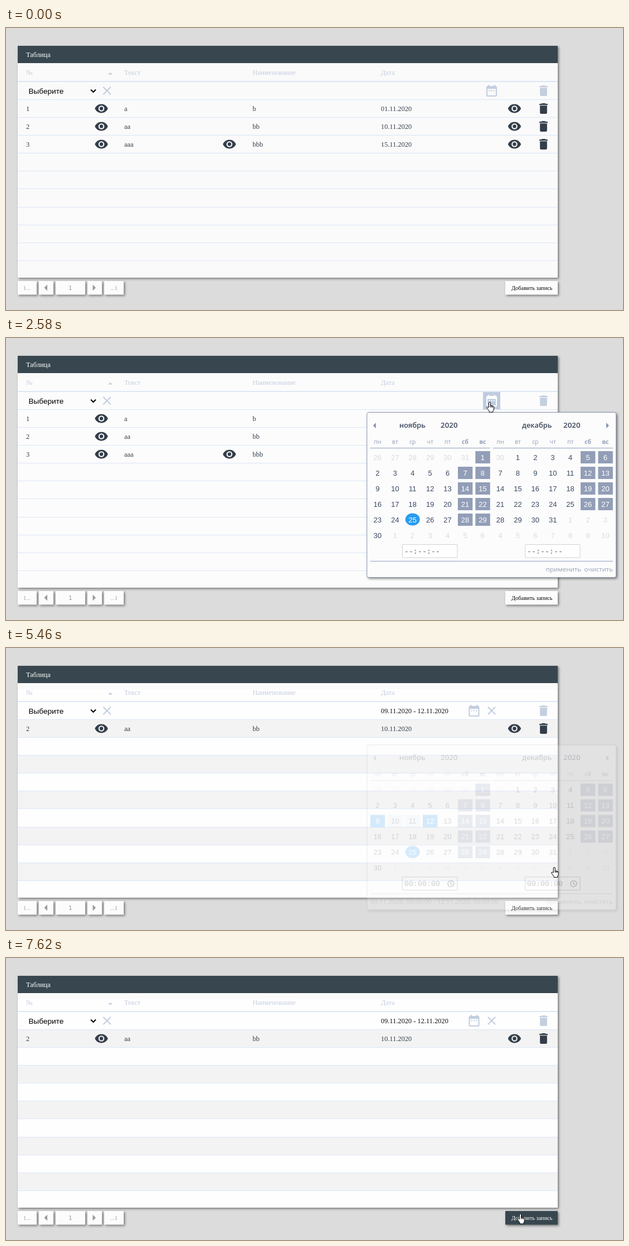
Write an HTML page that moves like this. It is 1106 px wide and 506 px high and loops after 7990 ms.

```html
<!DOCTYPE html>
<html lang="ru">
<head>
<meta charset="utf-8">
<style>
html, body { margin: 0; width: 100%; height: 100%; overflow: hidden; background: #dcdcdc; }
svg { display: block; width: 1106px; height: 506px; }
text { white-space: pre; }
.cell { font: 12.4px "Liberation Serif", serif; }
.btn { font: 10.4px "Liberation Serif", serif; }
.select { font: 13.6px "Liberation Sans", sans-serif; }
.page { font: 10.5px "Liberation Sans", sans-serif; }
.day { font: 13px "Liberation Sans", sans-serif; }
.month { font: 600 12.8px "Open Sans", sans-serif; }
.year { font: 600 13.4px "Open Sans", sans-serif; }
.week { font: 10.4px "Open Sans", sans-serif; }
.weekend { font: bold 10.4px "Open Sans", sans-serif; }
.foot { font: 11.5px "Open Sans", sans-serif; }
.time { font: 13.33px "Liberation Mono", monospace; }
.raised { filter: drop-shadow(2px 2px 2px #0007); }
</style>
</head>
<body>
<svg id="stage"></svg>
<script>
const LOOP = 7990, OPEN = 2130, APPLY = 5180, PICK1 = 3440, PICK2 = 4080;
const DARK = '#343e4a', PALE = '#c3cedf', BLUE = '#2b9cf0', SLATE = '#929eb7';
const ICON = {
  eye: 'M12 4.5C7 4.5 2.73 7.61 1 12c1.73 4.39 6 7.5 11 7.5s9.27-3.11 11-7.5c-1.73-4.39-6-7.5-11-7.5zM12 17a5 5 0 1 1 0-10 5 5 0 0 1 0 10zm0-8a3 3 0 1 0 0 6 3 3 0 0 0 0-6z',
  trash: 'M6 19q0 2 2 2h8q2 0 2-2V7H6zM19 4h-3.5l-1-1h-5l-1 1H5v2h14z',
  date: 'M9 11H7v2h2zm4 0h-2v2h2zm4 0h-2v2h2zm2-7h-1V2h-2v2H8V2H6v2H5q-2 0-2 2v14q0 2 2 2h14q2 0 2-2V6q0-2-2-2zm0 16H5V9h14z',
  close: 'M19 6.4 17.6 5 12 10.6 6.4 5 5 6.4 10.6 12 5 17.6 6.4 19 12 13.4 17.6 19 19 17.6 13.4 12z'
};
const ROWS = [['1', 'a', 'b', '01.11.2020'], ['2', 'aa', 'bb', '10.11.2020'], ['3', 'aaa', 'bbb', '15.11.2020']];
const COLS = [36, 212, 442, 672];

// Pointer path: time, x, y of the hot spot
const PATH = [
  [700, 832, 472], [1400, 838, 101], [1510, 845, 116], [1700, 862, 115], [1880, 867, 115],
  [2620, 867, 115], [2890, 785, 240], [3340, 667, 264], [3560, 668, 266], [3770, 737, 264],
  [3850, 755, 264], [3960, 761, 267], [4160, 761, 267], [4560, 984, 402], [4700, 988, 408],
  [5180, 986, 407], [5460, 983, 394], [5970, 888, 140], [6060, 886, 137], [6290, 906, 142],
  [6480, 906, 142], [7270, 915, 452], [7620, 922, 459]
];

const rect = (x, y, w, h, fill, more = '') =>
  `<rect x="${x}" y="${y}" width="${w}" height="${h}" fill="${fill}" ${more}/>`;
const text = (x, y, s, fill, cls, anchor = 'start') =>
  `<text x="${x}" y="${y}" fill="${fill}" class="${cls}" text-anchor="${anchor}">${s}</text>`;
const path = (d, fill, more = '') => `<path d="${d}" fill="${fill}" ${more}/>`;
const icon = (name, x, y, fill) =>
  path(ICON[name], fill, `transform="translate(${x} ${y}) scale(1.06) translate(-12 -12)"`);
const clamp = v => Math.min(1, Math.max(0, v));
const easeOut = u => 1 - (1 - u) ** 2;
const rowTop = i => Math.round(128.2 + 32.05 * i);

function pointer(t) {
  const k = PATH.findIndex(p => p[0] > t);
  if (k === 0) return [-99, -99];
  if (k < 0) return PATH[PATH.length - 1].slice(1);
  const [a, b] = [PATH[k - 1], PATH[k]], u = (t - a[0]) / (b[0] - a[0]);
  return [a[1] + (b[1] - a[1]) * u, a[2] + (b[2] - a[2]) * u];
}

const inside = ([x, y], l, t, r, b) => x >= l && x < r && y >= t && y < b;

function table(t, mouse, active) {
  const filtered = t >= APPLY;
  const striped = t >= 760 && t < OPEN || filtered;
  const flat = t < OPEN ? '#fafafa' : '#fcfcfc';
  const base = striped ? '#fefefe' : flat;
  let s = rect(21, 32, 968, 416, base, 'class="raised"');
  s += rect(21, 63, 968, 33, t < OPEN ? '#fafafa' : base) + rect(21, 63, 968, 11, '#fafafa');
  s += rect(21, 32, 968, 31, '#38474f') + text(36, 52, 'Таблица', '#fff', 'cell');
  ['№', 'Текст', 'Наименование', 'Дата'].forEach((h, i) => s += text(COLS[i], 84, h, PALE, 'cell'));
  s += path('M183 83.5l4-4 4 4z', PALE) + rect(21, 95.3, 968, 1.5, '#d3e2f6');

  s += text(40.5, 118, 'Выберите', '#000', 'select');
  s += path('M152 110.5l4.5 4.5 4.5-4.5', 'none', 'stroke="#000" stroke-width="2"');
  s += icon('close', 181, 112.5, PALE) + icon('trash', 963.5, 112.5, PALE);
  if (filtered) {
    s += text(672, 117, '09.11.2020 - 12.11.2020', '#111', 'cell');
    s += icon('date', 839, 112.5, PALE) + icon('close', 870.5, 112.5, PALE);
  } else {
    const hot = inside(mouse, 855, 97, 886, 128);
    if (hot) s += rect(855, 97, 31, 31, '#c0ccdf');
    s += icon('date', 870.5, 112.5, hot ? '#fff' : PALE);
  }

  const rows = filtered ? [ROWS[1]] : ROWS;
  for (let i = 0; i < 10; i++) {
    const y = rowTop(i), h = rowTop(i + 1) - y, mid = y + 16.5;
    const hot = active && inside(mouse, 21, y, 989, y + h);
    const ink = hot ? '#fff' : DARK;
    if (hot) s += rect(21, y, 968, h, '#7485a9');
    else if (striped && i % 2 === 0) s += rect(21, y, 968, h, '#f3f3f3');
    s += rect(21, y, 968, 1, '#dbe6f8');
    const row = rows[i];
    if (!row) continue;
    if (hot && mouse[0] >= 886) s += rect(mouse[0] < 938 ? 886 : 938, y + 1, 52, h - 1, '#5f738f');
    row.forEach((v, c) => s += text(COLS[c], mid + 4.3, v, ink, 'cell'));
    s += icon('eye', 171, mid, ink) + icon('eye', 911.5, mid, ink) + icon('trash', 963.5, mid, ink);
    if (row[0] === '3') s += icon('eye', 400.5, mid, ink);
  }
  return s;
}

function buttons(mouse, active) {
  const box = (x, w, fill = '#fcfcfc') => rect(x, 454, w, 24.5, fill, 'class="raised"');
  const hot = active && inside(mouse, 895, 452, 989, 479);
  return box(21, 34) + box(59, 26) + box(89, 53) + box(146, 26) + box(176, 35)
    + text(31, 470, '1...', '#8fa3b8', 'btn') + text(187, 470, '...1', '#9c9f9c', 'btn')
    + text(115.5, 470, '1', '#8c9298', 'page', 'middle')
    + path('M74 460.5v11l-5.5-5.5zM155.5 460.5v11l5.5-5.5z', '#9a9a9a')
    + box(895, 94, hot ? '#38474f' : '#fcfcfc')
    + text(906, 470, 'Добавить запись', hot ? '#fff' : '#000', 'btn');
}

function month(t, x0, name, lead, prev, days, trail) {
  let s = text(x0 + 39, 160.5, name, '#3a465c', 'month') + text(x0 + 113, 160.5, '2020', '#3a465c', 'year');
  'пн вт ср чт пт сб вс'.split(' ').forEach((d, c) =>
    s += text(x0 + 31.4 * c, 190, d, SLATE, c > 4 ? 'weekend' : 'week', 'middle'));
  s += rect(x0 - 13, 197, 215, 1, '#8ea0be');
  const november = days === 30;
  for (let i = 0; i < 42; i++) {
    const c = i % 7, x = x0 + 31.4 * c, y = 214 + 28 * Math.floor(i / 7);
    const d = i - lead + 1, other = d < 1 || d > days;
    const label = d < 1 ? prev + d : d > days ? d - days : d;
    let fill = '', ink = other ? '#d8dade' : '#3b4a63';
    if (!other) {
      const over = inside(trail, x - 13, y - 11, x + 13.4, y + 11);
      const last = t >= PICK2 ? 12 : Math.floor((trail[0] - 653) / 31.4) + 9;
      if (c > 4) { fill = SLATE; ink = '#fff'; }
      else if (november && (d === 9 && t >= PICK1 || d === 12 && t >= PICK2)) { fill = BLUE; ink = '#fff'; }
      else if (over) fill = '#d7dde4';
      else if (november && t >= PICK1 && d > 9 && d < Math.min(last, 12)) fill = '#dde8f3';
    }
    if (fill) s += rect(x - 13, y - 11, 26.4, 22, fill);
    if (november && d === 25) {
      s += `<ellipse cx="${x}" cy="${y - .5}" rx="13" ry="11" fill="${BLUE}"/>`;
      ink = '#fff';
    }
    s += text(x, y + 4.5, label, ink, 'day', 'middle');
  }
  return s;
}

function timeField(x, set) {
  let s = rect(x + .5, 370.5, 98.5, 23.5, '#fff', `stroke="${set ? '#555' : '#d2d2d2'}" rx="1"`);
  s += text(x + 4, 387, set ? '00:00:00' : '--:--:--', set ? '#111' : '#666', 'time');
  if (set) s += path(`M${x + 87.5} 378.5v4.5l3 1.5`, 'none', 'stroke="#111" stroke-width="1.4"')
    + `<circle cx="${x + 87.5}" cy="382.5" r="5.5" fill="none" stroke="#111" stroke-width="1.4"/>`;
  return s;
}

function calendar(t, mouse, hide) {
  const trail = pointer(t - 80);
  const hot = inside(mouse, 968, 405, 1032, 425);
  let range = '';
  if (t >= PICK1) range = '09.11.2020, 00:00:00';
  if (t >= PICK2) range += ' - 12.11.2020, 00:00:00';
  return `<g transform="translate(0 ${50 * hide})" opacity="${1 - hide}">`
    + rect(647, 133.5, 446.5, 296, '#fcfcfc', `rx="3" stroke="#8c9ab5" class="raised"`)
    + path('M663 152v10l-5-5zM1076 152v10l5-5z', '#8594b0')
    + month(t, 666, 'ноябрь', 6, 31, 30, trail) + month(t, 886, 'декабрь', 1, 30, 31, trail)
    + timeField(710, t >= PICK1) + timeField(930, t >= PICK2)
    + rect(653, 400, 435, 1, '#8ea0be') + text(653, 419, range, SLATE, 'foot')
    + text(1031, 419, 'применить', hot ? '#5f6f90' : SLATE, 'foot', 'end')
    + text(1088, 419, 'очистить', SLATE, 'foot', 'end') + '</g>';
}

function cursor([x, y], hand) {
  const shape = hand
    ? 'M-1.5 9.5V1.5a1.5 1.5 0 0 1 3 0V6l4.8 1.3q1.6.5 1.4 2.4l-.6 4.3-1.3 2.5v1.5h-6.5v-1.5l-4.2-6q-.6-2 1.2-2zM1.5 6v3.5M3.6 6.6v3M5.6 7.2v2.8'
    : 'M0 0V15l3.5-3.3 2.3 5.3 2.2-1-2.3-5.1h4.6z';
  return path(shape, '#fff', `stroke="#000" stroke-linejoin="round" transform="translate(${x} ${y})"`);
}

const stage = document.getElementById('stage');
let shown = '';

function draw(now) {
  const t = now % LOOP, mouse = pointer(t);
  const hide = t < APPLY ? 1 - easeOut(clamp((t - OPEN) / 400)) : easeOut(clamp((t - APPLY) / 500));
  const popup = hide < 1, active = t >= 700 && !popup;
  const onCell = active && t >= APPLY && inside(mouse, 886, 128, 989, 160);
  const hand = popup || onCell || inside(mouse, 855, 97, 886, 128) && t < APPLY
    || inside(mouse, 895, 452, 989, 479);
  const next = table(t, mouse, active) + buttons(mouse, active)
    + (popup ? calendar(t, mouse, hide) : '') + cursor(mouse, hand);
  if (next !== shown) stage.innerHTML = shown = next;
  requestAnimationFrame(() => draw(performance.now() - start));
}

const start = performance.now();
draw(0);
</script>
</body>
</html>
```
